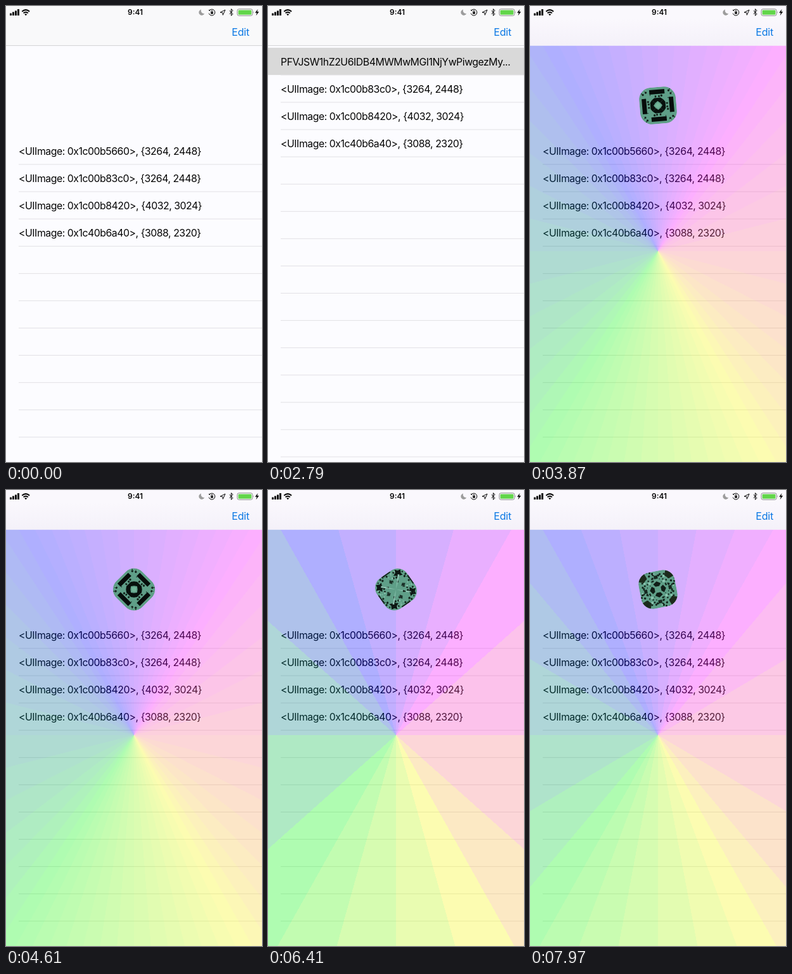
An HTML page for the animation above (8000 ms loop, 404 by 720 pixels).

```html
<!DOCTYPE html>
<html lang="en">
<head>
<meta charset="utf-8">
<title>Table refresh</title>
<style>
html, body { margin: 0; width: 100%; height: 100%; overflow: hidden; background: #fcfcff; }
svg { display: block; width: 100vw; height: 100vh; }
text { font-family: Inter, "Liberation Sans", sans-serif; }
.row { font-size: 15.8px; letter-spacing: -.45px; fill: #050505; }
</style>
</head>
<body>
<svg id="stage" viewBox="0 0 404 720">
  <defs>
    <clipPath id="tile"><rect x="-29" y="-29" width="58" height="58" rx="19"/></clipPath>
    <linearGradient id="barTint" x2="0" y2="1">
      <stop offset=".3" stop-color="#faf8fd"/><stop offset="1" stop-color="#f4f1f9"/>
    </linearGradient>
  </defs>
  <rect width="404" height="720" fill="#fcfcff"/>
  <g id="table"><rect id="selected" width="404" height="43" fill="#d9d9d9"/></g>
  <g id="wheel" shape-rendering="crispEdges"></g>
  <g id="badge" transform="translate(202 157)"><g id="spin" clip-path="url(#tile)"></g></g>

  <rect width="404" height="62.5" fill="#f9f9fa"/>
  <rect id="tint" width="404" height="62.5" fill="url(#barTint)"/>
  <rect id="hairline" y="62" width="404" height="1" fill="#d4d4d6"/>
  <text x="384" y="47" text-anchor="end" font-size="16" letter-spacing="-.2" fill="#0a78e4">Edit</text>

  <g id="status" fill="#050505">
    <path d="M6 11.5h3V15H6zM10 9.5h3V15h-3zM14 7.5h3V15h-3zM18 5h3V15h-3z"/>
    <g fill="none" stroke="#050505" stroke-width="2">
      <path d="M25.3 8.8Q31.2 3.5 37.1 8.8M27.6 11.3Q31.2 8.2 34.8 11.3"/>
    </g>
    <path d="M29.2 13q2-1.7 4 0l-2 2.2z"/>
    <text x="204" y="14.2" text-anchor="middle" font-size="11.8" font-weight="600">9:41</text>
    <path d="M308 5.6a4.6 4.6 0 1 0 5.2 6.2a4.6 4.6 0 0 1-5.2-6.2z" fill="#9c9c9c"/>
    <g fill="none" stroke="#050505" stroke-width="1">
      <path d="M321 7.1A4.9 4.9 0 1 1 320.2 11.6M323.8 9.6V8.6a1.2 1.2 0 0 1 2.4 0v1"/>
      <path d="M338 10.1l8-4-3.7 8.2-.7-4z"/>
      <path d="M352.6 7.2l5.6 5.4-2.8 2.6V4.7l2.8 2.6-5.6 5.4"/>
      <rect x="365" y="4.8" width="24" height="10.5" rx="2.6" stroke="#8a8a8a"/>
    </g>
    <path d="M319.4 6.2l3-.4-.8 2.5zM323.1 9.6h3.8v2.8h-3.8z"/>
    <rect x="366.6" y="6.4" width="20.8" height="7.3" rx="1.2" fill="#62d64a"/>
    <path d="M390 8.3q1.5 1.7 0 3.5z" fill="#8a8a8a"/>
    <path d="M397.4 5l-4.3 5.8h2.7l-1.2 4.5 4.6-6.2h-2.8z"/>
  </g>
</svg>
<script>
const LOOP = 8000, ROW = 43.07, TOP = 62.4, GAP = 144.6;
const $ = id => document.getElementById(id);
const clamp = (v, lo = 0, hi = 1) => Math.min(hi, Math.max(lo, v));
const ramp = (t, a, b) => clamp((t - a) / (b - a));
const ease = p => p < .5 ? 4 * p ** 3 : 1 - 4 * (1 - p) ** 3;

function add(parent, tag, attrs) {
  const el = document.createElementNS("http://www.w3.org/2000/svg", tag);
  for (const name in attrs) el.setAttribute(name, attrs[name]);
  return parent.appendChild(el);
}

// Table
const images = [
  ["0x1c00b5660", "3264, 2448"], ["0x1c00b83c0", "3264, 2448"],
  ["0x1c00b8420", "4032, 3024"], ["0x1c40b6a40", "3088, 2320"]
].map(([address, size]) => `<UIImage: ${address}>, {${size}}`);
const encoded = btoa(images[0]).slice(0, 36) + "...";
for (let i = 0; i < 16; i++)
  add($("table"), "rect", { x: 20, y: (i + 1) * ROW - .5, width: 384, height: 1, fill: "#e2e1e5" });
const labels = images.map((label, i) => {
  const el = add($("table"), "text", { x: 20, y: i * ROW + 27.8, class: "row" });
  el.textContent = label;
  return el;
});

// Colour wheel: equal steps along the edge of a box, colours blended between eight stops
const stops = [[128, 0, 255], [255, 0, 255], [255, 128, 128], [255, 255, 0],
  [128, 255, 0], [0, 255, 0], [0, 128, 128], [0, 0, 255]];
const side = s => clamp(2 - Math.abs((s + 2) % 8 - 4), -1, 1);
const edge = s => `${202 + 202 * side(s)},${387 - 360 * side(s + 2)}`;

function drawWheel(parts) {
  $("wheel").replaceChildren();
  for (let j = 0; j < 8 * parts; j++) {
    const i = Math.floor(j / parts), f = j % parts / parts, next = stops[(i + 1) % 8];
    const rgb = stops[i].map((c, n) => Math.round(c + (next[n] - c) * f));
    add($("wheel"), "polygon", {
      points: `202,387 ${edge(j / parts)} ${edge((j + 1) / parts)}`, fill: `rgb(${rgb})`
    });
  }
}

// Four-fold tile; each style has its own motif plus seeded speckles
const motifs = [
  [["M-12-25H12V-18H-12z", "#070d0b"], ["M-5-12H5L9-9 4-4 0-7-4-4-9-9z", "#08100d"],
   ["M-4-16h2.5v3h-2.5zM1.5-16H4v3H1.5z", "#122019"], ["M0-5L5 0H0z", "#74b69a"]],
  [["M-10-29H10L7-22 3-24 0-20-3-24-7-22z", "#0d1813"], ["M-7-17h6v6h-6zM3-16h5v5H3z", "#0f1c16"],
   ["M-5.5-15.5h3v3h-3zM4.5-14.5h2v2h-2z", "#6fae97"], ["M-21-17l5-4 1 4-3 3z", "#13221b"],
   ["M-27-27h9v6l-9 5z", "#78b5a9"]],
  [["M-22-24l4 3 5-1-2 5 3 4-5 0-3 4-2-5-5-2 4-3z", "#0d1713"], ["M-8-29H8V-27H-8z", "#14231c"],
   ["M0 0L-16-18-18-16z", "#8ec6b4"], ["M-3-14L0-18 3-14 0-10z", "#1b3028"]],
  [["M-27-27l10-1 3 8-6 6-8-3z", "#1c2a1c"], ["M-6-9L0-13 6-9 3-5H-3z", "#101d17"],
   ["M-3-22h6v5h-6z", "#16271f"], ["M-12-14l3 2-2 3-3-2z", "#8cc5b0"]]
];

function drawTile(style) {
  const g = $("spin");
  g.replaceChildren();
  add(g, "rect", { x: -29, y: -29, width: 58, height: 58, fill: "#5f9f88" });
  let seed = 17 + style * 31;
  const rnd = () => (seed = seed * 16807 % 2147483647) / 2147483647;
  rnd();
  const specks = Array.from({ length: style ? 26 : 9 }, () => ({
    cx: rnd() * 27 * (rnd() < .5 ? -1 : 1), cy: -5 - rnd() * 23, r: .6 + rnd() * 1.2,
    fill: rnd() < .65 ? "#14251d" : "#8dc7b2"
  }));
  for (let q = 0; q < 4; q++) {
    const quarter = add(g, "g", { transform: `rotate(${q * 90})` });
    specks.forEach(s => add(quarter, "circle", s));
    motifs[style].forEach(([d, fill]) => add(quarter, "path", { d, fill }));
  }
}

// Time and angle pairs of the turning tile
const turns = [[3500, -30], [4610, 45], [5690, 118], [7130, 172], [8000, 262]];
function angleAt(t) {
  const i = clamp(turns.findIndex(k => k[0] > t), 1, turns.length - 1);
  const [a, from] = turns[i - 1], [b, to] = turns[i];
  return from + (to - from) * ramp(t, a, b);
}

let current = -1;
function draw(t) {
  const gap = GAP * (1 - ease(ramp(t, 1300, 1900)) + ease(ramp(t, 2700, 3200)));
  $("table").setAttribute("transform", `translate(0 ${TOP + gap})`);
  $("selected").setAttribute("opacity", ramp(t, 1240, 1320) * (1 - ramp(t, 3450, 3700)));
  labels[0].textContent = t >= 1300 && t < 3500 ? encoded : images[0];

  const shown = ramp(t, 3600, 3850);
  $("wheel").setAttribute("opacity", .3 * shown);
  $("tint").setAttribute("opacity", shown);
  $("hairline").setAttribute("opacity", 1 - shown);
  $("badge").setAttribute("opacity", shown);
  $("spin").setAttribute("transform", `rotate(${angleAt(t)})`);

  const step = clamp(Math.floor((t - 4200) / 1100), 0, 3);
  if (step !== current) {
    current = step;
    drawWheel([7, 1, 2, 3][step]);
    drawTile(step);
  }
}

const start = performance.now();
function tick() {
  draw((performance.now() - start) % LOOP);
  requestAnimationFrame(tick);
}
tick();
</script>
</body>
</html>
```
